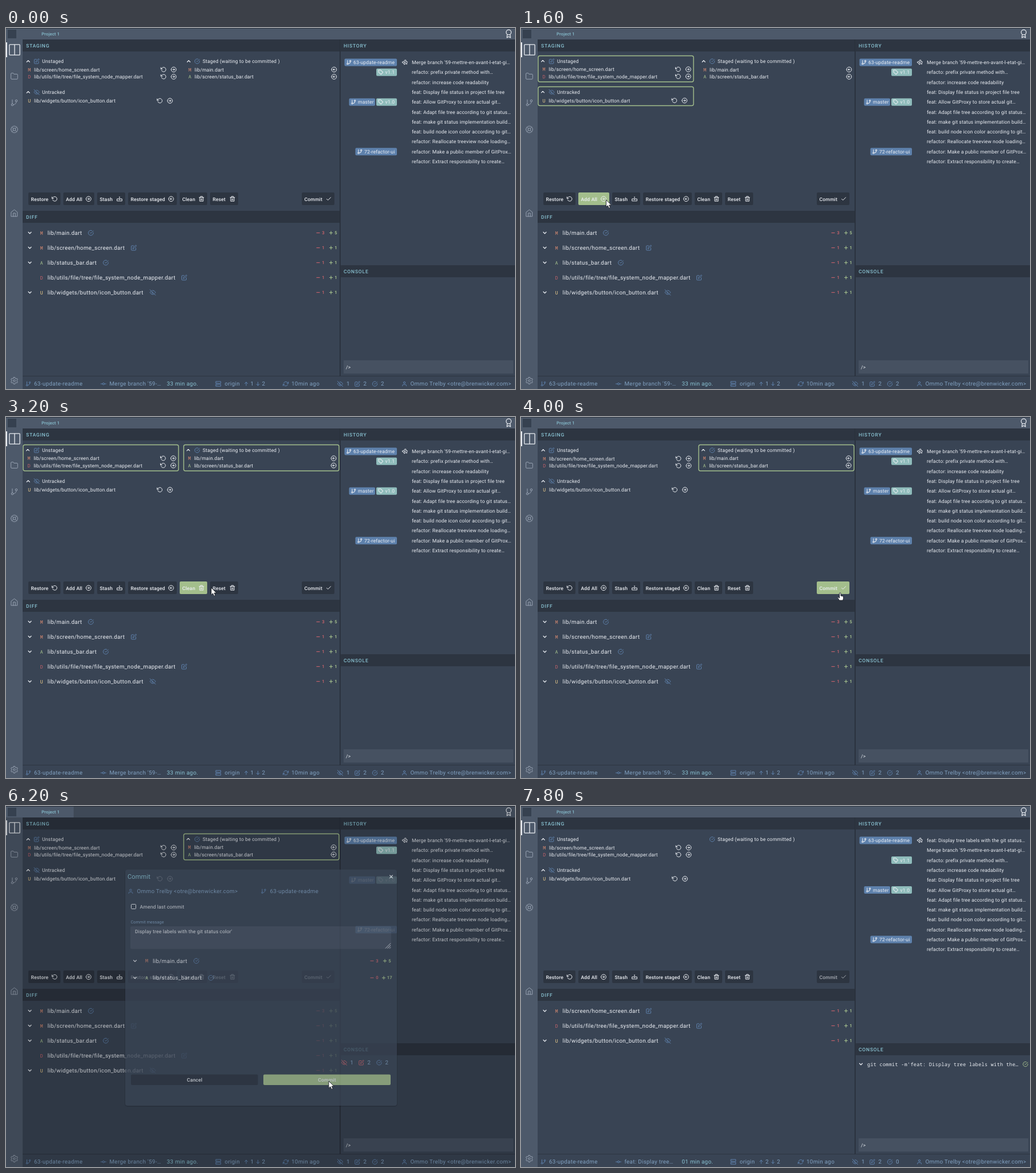
Recreate the animation shown at these times as an HTML page. Size 888 by 630 pixels, loop 8300 ms.

```html
<!DOCTYPE html>
<html lang="en">
<head>
<meta charset="utf-8">
<title>Commit workflow</title>
<style>
html, body { margin: 0; width: 100%; height: 100%; overflow: hidden; background: #394454; }
svg { display: block; width: 888px; height: 630px; }
text { font-family: Roboto, sans-serif; fill: #eceff4; text-rendering: geometricPrecision; }
.sm { font-size: 8.58px; letter-spacing: .153px; }
.md { font-size: 9.82px; letter-spacing: .307px; }
.btn { font-size: 8.58px; letter-spacing: .153px; font-weight: 500; }
.head { font-size: 8.58px; letter-spacing: .766px; font-weight: 500; }
.tab { font-size: 7.5px; letter-spacing: .2px; font-weight: 500; }
.title { font-size: 11.1px; letter-spacing: .1px; }
.label { font-size: 7.36px; }
.num { font-size: 7.6px; font-weight: 700; }
.code { font: 8.58px "Noto Sans Mono", monospace; letter-spacing: .24px; }
.mark { font: 8.4px "Noto Sans Mono", monospace; }
</style>
</head>
<body>
<svg id="stage" viewBox="0 0 888 630"></svg>
<script>
const LOOP = 8300;
const C = {
  bg: '#394454', dark: '#2d3541', bar: '#4d596a', field: '#465161', white: '#eceff4',
  cyan: '#88c0d0', sky: '#81a1c1', blue: '#5e81ac', teal: '#8fbcbb',
  red: '#bf616a', orange: '#d08770', yellow: '#ebcb8b', green: '#a3be8c', dim: '#97a2b2'
};
const MARKS = { M: C.orange, D: C.red, U: C.yellow, A: C.green };
const AUTHOR = 'Ommo Trelby <otre@brenwicker.com>';
const BRANCH = '63-update-readme';

// Icons on a 24 unit grid
const ring = (x, y, r) => `M${x - r} ${y}a${r} ${r} 0 1 0 ${2 * r} 0a${r} ${r} 0 1 0 ${-2 * r} 0`;
const ICONS = {
  up: 'M6 15l6-6 6 6',
  down: 'M6 9l6 6 6-6',
  edit: 'M11 4H4a2 2 0 0 0-2 2v14a2 2 0 0 0 2 2h14a2 2 0 0 0 2-2v-7M18.5 2.5a2.1 2.1 0 0 1 3 3L12 15l-4 1 1-4z',
  hidden: 'M18 18A10 10 0 0 1 12 20C5 20 1 12 1 12A18 18 0 0 1 6 6M10 4.2A9 9 0 0 1 12 4c7 0 11 8 11 8a18 18 0 0 1-2.2 3.2M14 14a3 3 0 1 1-4.2-4.2M1 1l22 22',
  done: 'M22 11v1a10 10 0 1 1-6-9.1M22 4L12 14l-3-3',
  undo: 'M1 4v6h6M3.5 15a9 9 0 1 0 2.1-9.4L1 10',
  right: ring(12, 12, 10) + 'M12 16l4-4-4-4M8 12h8',
  left: ring(12, 12, 10) + 'M12 8l-4 4 4 4M16 12h-8',
  stash: 'M7 12H2v8h20v-8h-5M12 3v12M8 11l4 4 4-4',
  trash: 'M3 6h18M19 6v15H5V6M8 6V2h8v4M10 11v6M14 11v6',
  check: 'M20 6L9 17l-5-5',
  branch: 'M6 3v12M18 9a9 9 0 0 1-9 9' + ring(18, 6, 3) + ring(6, 18, 3),
  commit: ring(12, 12, 4) + 'M1 12h7M16 12h7',
  server: 'M2 2h20v8H2zM2 14h20v8H2zM6 6h.1M6 18h.1',
  arrowUp: 'M12 20V4M5 11l7-7 7 7',
  arrowDown: 'M12 4v16M5 13l7 7 7-7',
  sync: 'M23 4v6h-6M1 20v-6h6M3.5 9a9 9 0 0 1 14.9-3.4L23 10M1 14l4.6 4.4A9 9 0 0 0 20.5 15',
  user: 'M4 21v-2a4 4 0 0 1 4-4h8a4 4 0 0 1 4 4v2' + ring(12, 7, 4),
  columns: 'M3 2h18a1 1 0 0 1 1 1v18a1 1 0 0 1-1 1H3a1 1 0 0 1-1-1V3a1 1 0 0 1 1-1zM12 2v20',
  folder: 'M22 19a2 2 0 0 1-2 2H4a2 2 0 0 1-2-2V5a2 2 0 0 1 2-2h5l2 3h9a2 2 0 0 1 2 2z',
  buoy: ring(12, 12, 10) + ring(12, 12, 4) + 'M5 5l4 4M15 15l4 4M15 9l4-4M5 19l4-4',
  home: 'M3 9l9-7 9 7v13H3zM9 22V12h6v10',
  gear: ring(12, 12, 3) + 'M10 2h4l.7 3 2.3 1.2 3-1 2 3.5-2.3 2v2.6l2.3 2-2 3.5-3-1-2.3 1.2-.7 3h-4l-.7-3-2.3-1.2-3 1-2-3.5 2.3-2v-2.6l-2.3-2 2-3.5 3 1L9.3 5z',
  award: ring(12, 8, 7) + 'M8 14l-1 9 5-3 5 3-1-9',
  tag: 'M21 13l-8 8L2 11V2h9l10 9zM7 7h.1',
  head: 'M2 10l7-2 2-5h5v5l6 2-3 4 1 5-6-2-5 4-1-6-5-1z' + ring(12, 12, 2),
  close: 'M5 5l14 14M19 5L5 19'
};
const SIZES = { md: 9.82, title: 11.1, tab: 7.5, label: 7.36, num: 7.6 };

const stage = document.getElementById('stage');
function add(parent, tag, attrs = {}) {
  const el = document.createElementNS('http://www.w3.org/2000/svg', tag);
  for (const key in attrs) el.setAttribute(key, attrs[key]);
  return parent.appendChild(el);
}
const group = (parent = stage) => add(parent, 'g');
const rect = (g, x, y, width, height, fill, rx = 0) => add(g, 'rect', { x, y, width, height, fill, rx });
const path = (g, d, stroke, width = 1, fill = 'none') => add(g, 'path', { d, fill, stroke, 'stroke-width': width });
function text(g, x, cy, value, kind = 'sm', fill = C.white, anchor = 'start') {
  const el = add(g, 'text', { x, y: cy + (SIZES[kind] || 8.58) * .355, class: kind, 'text-anchor': anchor });
  el.style.fill = fill;
  el.textContent = value;
  return el;
}
function icon(g, name, cx, cy, size = 10.5, color = C.white, weight = 1) {
  const k = size / 24;
  add(g, 'path', {
    d: ICONS[name], fill: 'none', stroke: color, 'stroke-width': weight / k, 'stroke-linecap': 'round',
    'stroke-linejoin': 'round', transform: `translate(${cx - size / 2} ${cy - size / 2}) scale(${k})`
  });
}

// Window frame
const base = group();
rect(base, 0, 0, 888, 630, C.bg);
rect(base, 0, 20, 29, 610, C.bar);
rect(base, 0, 0, 888, 20, C.bar);
rect(base, 0, 0, 888, 1, C.dark);
rect(base, 582, 20, 2, 588, C.dark);
rect(base, 29, 607, 859, 1, C.dark);
for (const [x, y, w, name] of [[29, 20, 554, 'STAGING'], [583, 20, 305, 'HISTORY'], [29, 319, 554, 'DIFF'], [583, 414, 305, 'CONSOLE']]) {
  rect(base, x, y, w, 21, C.dark);
  text(base, x + 6, y + 11, name, 'head', C.cyan);
}
rect(base, 582, 20, 1, 588, '#28303b');
rect(base, 0, 25, 2, 26, C.white);
icon(base, 'columns', 15, 38, 22, C.white, 1.3);
for (const [name, y] of [['folder', 84], ['branch', 130.5], ['buoy', 177], ['home', 323], ['gear', 615.5]])
  icon(base, name, 14.5, y, 14, C.dim);
icon(base, 'award', 877, 10, 15, C.white, 1.2);
rect(base, 589, 580, 296, 23, C.field);
text(base, 593, 591.5, '/>');

// Staging lists
function list(x, y, w, h, name, kind) {
  const g = group(base);
  const box = add(g, 'rect', { x, y, width: w, height: h, rx: 3, fill: 'none', stroke: C.green, 'stroke-width': 1.4 });
  icon(g, kind, x + 23.5, y + 9.5, 10, C.blue);
  text(g, x + 33, y + 9.5, name);
  const rows = group(g);
  icon(rows, 'up', x + 8.7, y + 9.5, 10, C.white, 1.2);
  return { box, rows };
}
function file(g, x, y, mark, name) {
  text(g, x, y, mark, 'mark', MARKS[mark]);
  text(g, x + 10.7, y, name);
}
const unstaged = list(30, 48.5, 271, 45.5, 'Unstaged', 'edit');
file(unstaged.rows, 38.3, 72.5, 'M', 'lib/screen/home_screen.dart');
file(unstaged.rows, 38.3, 85, 'D', 'lib/utils/file/tree/file_system_node_mapper.dart');
const untracked = list(30, 102.5, 271, 33, 'Untracked', 'hidden');
file(untracked.rows, 38.3, 127, 'U', 'lib/widgets/button/icon_button.dart');
const staged = list(310, 48.5, 271, 45.5, 'Staged (waiting to be committed )', 'done');
file(staged.rows, 318.3, 72.5, 'M', 'lib/main.dart');
file(staged.rows, 318.3, 85, 'A', 'lib/screen/status_bar.dart');
for (const y of [72.5, 85]) {
  icon(unstaged.rows, 'undo', 275, y);
  icon(unstaged.rows, 'right', 292.5, y);
  icon(staged.rows, 'left', 572.3, y);
}
icon(untracked.rows, 'undo', 268.5, 127);
icon(untracked.rows, 'right', 286, 127);

// Buttons: label, left, right, icon, hover start, hover end
const buttons = [
  ['Restore', 39, 95, 'undo', 800, 1100], ['Add All', 100, 154, 'right', 1100, 1700],
  ['Stash', 159, 208, 'stash', 1700, 2100], ['Restore staged', 213, 298, 'left', 2100, 2800],
  ['Clean', 303, 351, 'trash', 2900, 3200], ['Reset', 356, 405, 'trash', 3200, 3700],
  ['Commit', 516, 573, 'check', 3700, 4700]
].map(([name, x, end, symbol, from, to]) => {
  const g = group(base);
  rect(g, x, 287, end - x, 22, C.dark, 2);
  const hover = rect(g, x, 287, end - x, 22, C.green, 2);
  const face = group(g);
  text(face, x + 4.5, 298.5, name, 'btn');
  icon(face, symbol, end - 10, 298.3);
  return { hover, face, from, to };
});

// Content that differs before and after the commit
const MESSAGES = [
  "Merge branch '59-mettre-en-avant-l-etat-gi…", 'refacto: prefix private method with…',
  'refactor: increase code readability', 'feat: Display file status in project file tree',
  'feat: Allow GitProxy to store actual git…', 'feat: Adapt file tree according to git status…',
  'feat: make git status implementation build…', 'feat: build node icon color according to git…',
  'refactor: Reallocate treeview node loading…', 'refactor: Make a public member of GitProx…',
  'refactor: Extract responsibility to create…'
];
const rowY = i => 60 + i * 17.3;
function badge(g, x, end, row, symbol, name, color) {
  const y = rowY(row);
  rect(g, x - .5, y - 6.5, end - x + .5, 13, color, 2);
  icon(g, symbol, x + 7.3, y, 9.5);
  text(g, x + 15, y, name);
}
function history(g, messages, shift) {
  messages.forEach((m, i) => text(g, 708, rowY(i), m));
  badge(g, 591, 682, 0, 'branch', BRANCH, C.blue);
  badge(g, 646.5, 682, 1 + shift, 'tag', 'v1.1', C.teal);
  badge(g, 599, 644, 4 + shift, 'branch', 'master', C.blue);
  badge(g, 646.5, 682, 4 + shift, 'tag', 'v1.0', C.teal);
  badge(g, 610, 682, 9 + shift, 'branch', '72-refactor-ui', C.blue);
  icon(g, 'head', 696, 60);
}
function diffRow(g, x, y, mark, name, iconX, kind, end, minus, plus) {
  if (mark !== 'D') icon(g, 'down', x, y, 10, C.white, 1.2);
  text(g, x + 18, y, mark, 'mark', MARKS[mark]);
  text(g, x + 31, y, name, 'md');
  icon(g, kind, iconX, y, 10.5, C.blue);
  const extra = plus > 9 ? 2 : 0;
  path(g, `M${end - 36 - extra} ${y}h6`, C.red, 1.2);
  text(g, end - 22 - extra, y, minus, 'num', C.red, 'end');
  path(g, `M${end - 13.5 - 2 * extra} ${y}h6m-3-3v6`, C.green, 1.2);
  text(g, end, y, plus, 'num', C.green, 'end');
}
const DIFFS = [
  ['M', 'lib/main.dart', 148, 'done', 3, 5], ['M', 'lib/screen/home_screen.dart', 223, 'edit', 1, 1],
  ['A', 'lib/status_bar.dart', 174, 'done', 1, 1],
  ['D', 'lib/utils/file/tree/file_system_node_mapper.dart', 311, 'edit', 1, 1],
  ['U', 'lib/widgets/button/icon_button.dart', 256, 'hidden', 1, 1]
];
function diffs(g, rows) {
  rows.forEach(([mark, name, iconX, kind, minus, plus], i) =>
    diffRow(g, 41.5, 357.5 + i * 26, mark, name, iconX, kind, 577.5, minus, plus));
}
function status(g, message, age, ahead, ready) {
  text(g, 180.5, 621, message, 'md', C.sky);
  text(g, 280.5, 621, age, 'md', C.cyan);
  text(g, 426.5, 621, ahead, 'md', C.sky);
  text(g, 654, 621, ready, 'md', C.sky);
}
const before = group(base);
history(before, MESSAGES, 0);
diffs(before, DIFFS);
status(before, "Merge branch '59-…", '33 min ago.', 1, 2);
const after = group(base);
history(after, ['feat: Display tree labels with the git status…', ...MESSAGES], 1);
diffs(after, DIFFS.filter(d => d[3] !== 'done'));
status(after, 'feat: Display tree…', '01 min ago.', 2, 0);
icon(after, 'down', 593, 450.5, 10, C.white, 1.2);
text(after, 604, 450.5, "git commit -m'feat: Display tree labels with the…", 'code');
icon(after, 'done', 880, 450.5, 10, C.green);

for (const [name, x] of [['branch', 39], ['commit', 170], ['server', 370.5], ['arrowUp', 419], ['arrowDown', 439.5],
  ['sync', 488], ['hidden', 583], ['edit', 613], ['done', 643.5], ['user', 695]])
  icon(base, name, x, 621, name.startsWith('arrow') ? 9 : 10, C.blue);
for (const [x, value] of [[49, BRANCH], [381.5, 'origin'], [446.5, '2'], [498, '10min ago'], [594, '1'], [623.5, '2'], [705.5, AUTHOR]])
  text(base, x, 621, value, 'md', C.sky);

// Shade, tab and dialog
const shade = rect(stage, 0, 0, 888, 630, '#000');
const tab = group();
rect(tab, 0, 1, 118, 19, C.bar);
rect(tab, 3, 3, 15, 15, '#364150');
text(tab, 62, 10.5, 'Project 1', 'tab', C.cyan);

const dialog = group();
rect(dialog, 207, 111, 476, 414, 'rgba(0,0,0,.15)', 5);
rect(dialog, 208, 111, 474, 412, C.bg, 4);
text(dialog, 212, 123.5, 'Commit', 'title', C.cyan);
icon(dialog, 'close', 672, 123.3, 8, C.white, 1.2);
icon(dialog, 'user', 217.5, 148.8, 10, C.blue);
text(dialog, 228.5, 148.8, AUTHOR, 'md', C.sky);
icon(dialog, 'branch', 449.5, 148.8, 10, C.blue);
text(dialog, 460.5, 148.8, BRANCH, 'md', C.sky);
add(dialog, 'rect', { x: 218.5, y: 171.5, width: 8, height: 8, rx: 1, fill: 'none', stroke: C.white });
text(dialog, 233.5, 176, 'Amend last commit');
text(dialog, 217.5, 202.7, 'Commit message', 'label', C.sky);
rect(dialog, 217, 210, 455, 39.5, C.field, 2);
text(dialog, 225, 218.8, "Display tree labels with the git status color'");
path(dialog, 'M662 248.5l9-9M665.5 248.5l5.5-5.5M669 248.5l2-2', C.white, .9);
diffRow(dialog, 225, 270.3, 'M', 'lib/main.dart', 332, 'done', 671.5, 3, 5);
diffRow(dialog, 225, 299.8, 'A', 'lib/status_bar.dart', 357.5, 'done', 673.5, 0, 17);
for (const [name, x, color, n] of [['hidden', 590, C.red, 1], ['edit', 620, C.red, 2], ['done', 651, C.blue, 2]]) {
  icon(dialog, name, x, 447.8, 10, color);
  text(dialog, x + 10.5, 447.8, n, 'md', C.sky);
}
rect(dialog, 218, 468.5, 221.5, 18.5, C.dark, 2);
rect(dialog, 449, 468.5, 222, 18.5, C.dark, 2);
const confirmHover = rect(dialog, 449, 468.5, 222, 18.5, C.green, 2);
text(dialog, 329, 478, 'Cancel', 'btn', C.white, 'middle');
text(dialog, 560, 478, 'Commit', 'btn', C.white, 'middle');

// Pointer
const pointer = group();
const arrow = path(pointer, 'M0 0V12.5L2.9 9.8L4.9 14.4L7.2 13.4L5.2 9H9.2Z', '#1b2028', .9, '#fff');
const hand = path(pointer, 'M-1.5 0a1.2 1.2 0 0 1 2.4 0V4l4.6 1v4L4.5 12H-1.5L-4.5 7.5l1-1 2 1.5z', '#1b2028', .9, '#fff');
const TRACK = [
  [600, 96, 232], [900, 68, 298], [1000, 74, 298], [1100, 112, 298], [1400, 140, 299], [1600, 148.5, 300],
  [1700, 178, 300], [1900, 190, 299], [2200, 240, 298], [2300, 257, 298], [2700, 257, 298], [3000, 318, 298],
  [3200, 358, 298], [3600, 392, 299], [3700, 440, 302], [3800, 530, 305], [4000, 557, 308], [4600, 557, 308],
  [4800, 560, 340], [5200, 564.5, 421], [5400, 563, 461], [5500, 563, 480], [7000, 563, 480], [7100, 130, 416]
];
const HANDS = [[1300, 1500], [2400, 2800], [3400, 3700], [3900, 4600], [5500, 6000]];

const clamp = v => Math.max(0, Math.min(1, v));
const within = (t, spans) => spans.some(([from, to]) => t >= from && t < to);
const show = (el, on) => el.setAttribute('visibility', on ? 'visible' : 'hidden');
const fade = (el, v) => el.setAttribute('opacity', v);
const hoverAt = (t, from, to) => t < to ? clamp((t - from) / 300) : clamp(1 - (t - to) / 200);

function outline(part, on) {
  show(part.box, on);
  part.rows.setAttribute('transform', on ? 'translate(-.7 -.4)' : '');
}
function movePointer(t) {
  show(arrow, false);
  show(hand, false);
  if (t < 600 || t >= 7200) return;
  const i = Math.max(1, TRACK.findIndex(k => k[0] >= t));
  const [[t0, x0, y0], [t1, x1, y1]] = [TRACK[i - 1], TRACK[i]];
  const p = (t - t0) / (t1 - t0);
  pointer.setAttribute('transform', `translate(${x0 + (x1 - x0) * p} ${y0 + (y1 - y0) * p})`);
  show(within(t, HANDS) ? hand : arrow, true);
}
function render(now) {
  const t = Math.floor(now % LOOP / 100) * 100;
  const committed = t >= 6300;
  show(before, !committed);
  show(after, committed);
  show(staged.rows, !committed);
  outline(unstaged, within(t, [[800, 2100], [3200, 3700]]));
  outline(untracked, within(t, [[1100, 1700], [2900, 3200]]));
  outline(staged, within(t, [[2100, 2800], [3200, 6300]]));
  for (const b of buttons) fade(b.hover, hoverAt(t, b.from, b.to));
  fade(buttons[6].face, committed ? .65 : 1);
  const open = Math.min(clamp((t - 4500) / 300), clamp((6500 - t) / 400));
  fade(shade, open * .24);
  fade(dialog, open);
  fade(confirmHover, clamp((t - 5400) / 300));
  movePointer(t);
}
const start = performance.now();
function tick() {
  render(performance.now() - start);
  requestAnimationFrame(tick);
}
tick();
</script>
</body>
</html>
```
